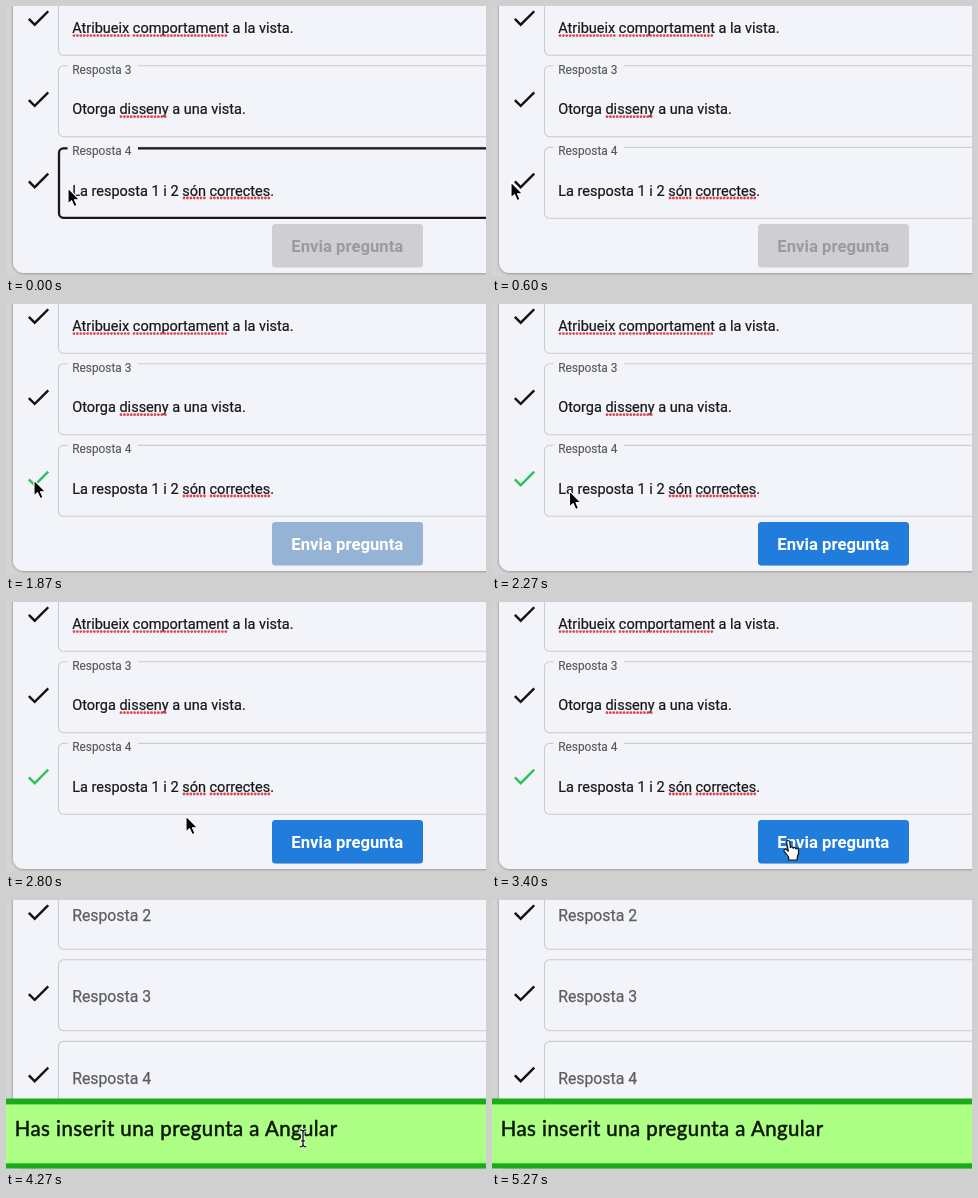
Write an HTML page that moves like this. It is 480x270 px and loops after 6340 ms.

```html
<!DOCTYPE html>
<html lang="ca">
<head>
<meta charset="utf-8">
<title>Envia pregunta</title>
<style>
  html, body { margin: 0; width: 100%; height: 100%; overflow: hidden; background: #d6d3d4; }
  svg { display: block; width: 480px; height: 270px; }
  text { font-family: Roboto, Arial, sans-serif; white-space: pre; }
  .answer { font-size: 14.5px; fill: #17171a; stroke: #17171a; stroke-width: .22; }
  .label { font-size: 11.85px; fill: #55565a; stroke: #55565a; stroke-width: .15; }
  .hint { font-size: 15.8px; fill: #5c5d62; stroke: #5c5d62; stroke-width: .25; }
  .field { fill: none; stroke: #cbccd0; stroke-width: 1.1; }
  .squiggle { stroke: #dc4750; stroke-width: 2.8; stroke-linecap: round; stroke-dasharray: 0 3.4; }
  .send { font-size: 16.7px; font-weight: 700; text-anchor: middle; }
  .toast { font-family: Lato, "Noto Sans", sans-serif; font-size: 20.4px; letter-spacing: .45px; fill: #0a1606; stroke: #0a1606; stroke-width: .5; }
</style>
</head>
<body>
<svg viewBox="0 0 480 270">
  <defs>
    <filter id="shade" x="-5%" y="-5%" width="110%" height="115%">
      <feDropShadow dx="0" dy="0.5" stdDeviation="1.8" flood-color="#000" flood-opacity=".38"/>
    </filter>
    <path id="tick" d="M9 16.17 4.83 12 3.41 13.41 9 19 21 7 19.59 5.59Z"/>
  </defs>
  <rect width="480" height="270" fill="#d6d3d4"/>
  <rect x="7" y="-30" width="500" height="297" rx="11" fill="#f3f4f9" filter="url(#shade)"/>
  <g id="rows"></g>
  <g id="filled"></g>
  <g id="empty"></g>
  <g id="button">
    <rect x="266" y="218" width="151" height="43.5" rx="3.5" fill="#cfcfd2"/>
    <rect id="blue" x="266" y="218" width="151" height="43.5" rx="3.5" fill="#217ddb"/>
    <rect id="ripple" x="266" y="218" width="151" height="43.5" rx="3.5" fill="#fff"/>
    <text id="send" class="send" x="341.3" y="245.6">Envia pregunta</text>
  </g>
  <g id="toast">
    <rect y="198.5" width="480" height="70" fill="#18ad18"/>
    <rect y="204.4" width="480" height="58.9" fill="#adff86"/>
    <text class="toast" x="8.8" y="236">Has inserit una pregunta a Angular</text>
  </g>
  <g id="cursor">
    <path id="arrow" d="M0 0V16L3.6 12.7 6.2 18.6 9 17.4 6.5 11.7H11.4Z"
      fill="#050505" stroke="#fff" stroke-width="1.1" stroke-linejoin="round"/>
    <path id="hand" d="M-1.6 1 .1 10.2-1.8 8.6C-3.4 7.6-5 9-3.8 10.6L.4 16V19H9V16.2C10.6 13.6 10.8 11 10.2 8.4 9.8 6.8 8 6.8 7.8 8 7.4 6.2 5.4 6 5.1 7.4 4.6 5.6 2.6 5.6 2.2 6.6L1.5 1C1.4-1-1.6-1-1.6 1Z"
      fill="#fff" stroke="#111" stroke-width="1.2" stroke-linejoin="round"/>
    <g id="beam" fill="none" stroke-linecap="round">
      <path id="stem" d="M-3-8.5Q0-8.5 0-6Q0-8.5 3-8.5M0-6V6M-3 8.5Q0 8.5 0 6Q0 8.5 3 8.5M-1.5 2.5H1.5" stroke="#fff" stroke-width="3"/>
      <path d="M-3-8.5Q0-8.5 0-6Q0-8.5 3-8.5M0-6V6M-3 8.5Q0 8.5 0 6Q0 8.5 3 8.5M-1.5 2.5H1.5" stroke="#111" stroke-width="1.3"/>
    </g>
  </g>
</svg>
<script>
const LOOP = 6340, STEP = 200 / 3;
const BLUR = 130, PICK = 1870, OVER = 3070, PRESS = 3670, BUSY = 4130, DONE = 4260;
const $ = id => document.getElementById(id);

// top edge, text, underlined spans
const fields = [
  [-21.6, 'Atribueix comportament a la vista.', [[68, 123], [128, 222]]],
  [59.8, 'Otorga disseny a una vista.', [[115, 162]]],
  [141.4, 'La resposta 1 i 2 són correctes.', [[178, 199], [205, 265]]]
];

fields.forEach(([y, answer, spans], i) => {
  const name = 'Resposta ' + (i + 2);
  const base = y - i * .3;
  $('rows').innerHTML +=
    `<rect class="field" x="52.5" y="${y}" width="460" height="70.9" rx="5"/>
     <use class="tick" href="#tick" transform="translate(17.9 ${base + 19.3}) scale(1.2)" fill="#111114"/>`;
  $('filled').innerHTML +=
    (i === 2 ? `<rect id="focus" x="53" y="${y + 1}" width="460" height="69.4" rx="4.5" fill="none" stroke="#18181d" stroke-width="2.3"/>` : '') +
    `<rect x="61.5" y="${y - 2}" width="70.5" height="5" fill="#f3f4f9"/>
     <text class="label" x="66.2" y="${base + 8.2}">${name}</text>
     <text class="answer" x="66.2" y="${base + 48.9}">${answer}</text>` +
    spans.map(([a, b]) => `<path class="squiggle" d="M${a} ${base + 51.2}H${b}"/>`).join('');
  $('empty').innerHTML += `<text class="hint" x="66.2" y="${base + 42.8}">${name}</text>`;
});
const lastTick = document.querySelectorAll('.tick')[2];

// time, x, y of the pointer
const path = [
  [0, 62, 182], [70, 52, 180], [200, 25, 177], [267, 19, 176], [600, 19, 176], [667, 22, 176],
  [870, 22, 176], [1130, 26, 175], [1270, 27, 175], [1470, 28, 176], [1870, 28, 176],
  [2070, 48, 180], [2270, 78, 187], [2530, 112, 197], [2800, 180, 214], [3130, 278, 238],
  [3330, 296, 239], [3670, 297, 239], [4600, 297, 238], [4800, 326, 254], [5000, 374, 284]
];

function at(t) {
  const i = path.findIndex(p => p[0] > t);
  if (i < 0) return path[path.length - 1].slice(1);
  const [a, b] = [path[i - 1], path[i]], k = (t - a[0]) / (b[0] - a[0]);
  return [a[1] + (b[1] - a[1]) * k, a[2] + (b[2] - a[2]) * k];
}

const ramp = (t, from, span) => Math.min(1, Math.max(0, (t - from) / span));
const show = (id, on) => $(id).style.display = on ? '' : 'none';

function draw(time) {
  const t = Math.floor((time + 4) / STEP) * STEP;
  const done = t >= DONE, picked = t >= PICK - 4;
  show('focus', t < BLUR);
  show('filled', !done);
  show('empty', done);
  show('button', !done);
  show('toast', done);
  lastTick.setAttribute('fill', picked && !done ? '#2cc35b' : '#111114');
  $('blue').style.opacity = ramp(t, PICK - 70, 200);
  $('ripple').style.opacity = .09 * ramp(t, PRESS - 70, 270);
  $('send').setAttribute('fill', picked ? '#fff' : '#9b9b9f');
  const [x, y] = at(t);
  $('cursor').setAttribute('transform', `translate(${x.toFixed(2)} ${y.toFixed(2)})`);
  show('arrow', t < OVER);
  show('hand', t >= OVER && t < BUSY);
  show('beam', t >= BUSY);
}

const start = performance.now();
function tick() {
  draw((performance.now() - start) % LOOP);
  requestAnimationFrame(tick);
}
draw(0);
requestAnimationFrame(tick);
</script>
</body>
</html>
```
